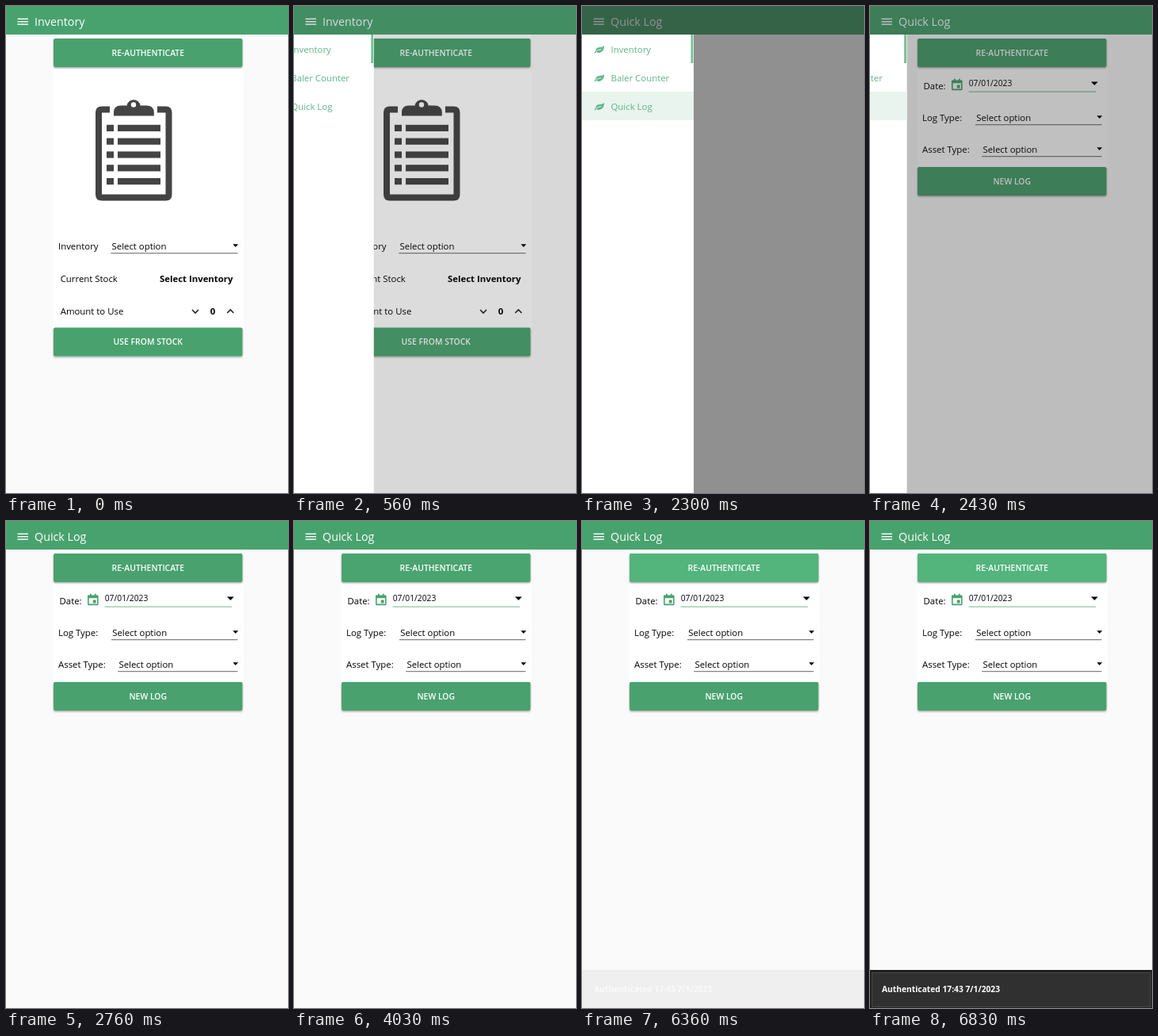
An HTML page for the animation above (8000 ms loop, 356x614 px).

```html
<!DOCTYPE html>
<html lang="en">
<head>
<meta charset="utf-8">
<title>Inventory</title>
<style>
html, body { margin: 0; width: 100%; height: 100%; overflow: hidden; background: #fafafa; }
svg { display: block; width: 100%; height: 100%; }
text { font-family: "Open Sans", "Noto Sans", sans-serif; font-size: 11.4px; white-space: pre; }
.title { font-size: 14.3px; fill: #fff; }
.btn { font-size: 10.4px; font-weight: 600; fill: #fff; text-anchor: middle; }
.bold { font-weight: 700; }
.nav { fill: #5fb588; }
</style>
</head>
<body>
<svg id="stage" viewBox="0 0 356 614" xmlns="http://www.w3.org/2000/svg"></svg>
<script>
const LOOP = 8000;
const GREEN = '#48a26e';
const DRAWER = 141;

const text = (x, y, s, cls = '', extra = '') => `<text x="${x}" y="${y}" class="${cls}" ${extra}>${s}</text>`;
const rect = (x, y, w, h, fill, extra = '') =>
  `<rect x="${x}" y="${y}" width="${w}" height="${h}" fill="${fill}" ${extra}/>`;
const path = (d, extra = '') => `<path d="${d}" ${extra}/>`;
const caret = (x, y, w, h) => path(`M${x} ${y}h${w}l${-w / 2} ${h}z`);

const button = (y, label, cx) =>
  rect(60, y, 238.5, 36, GREEN, 'rx="2" filter="url(#lift)"') + text(cx, y + 21.8, label, 'btn');

const select = (x, y) =>
  text(x + 1.2, y, 'Select option') +
  rect(x, y + 4.2, 292.5 - x, 1, '#666') +
  caret(286.4, y - 6.8, 6.8, 3.8);

function clipboard() {
  let rows = '';
  for (let i = 0; i < 5; i++) {
    const y = 149.8 + i * 16.8;
    rows += rect(127, y, 9, 8.2, '#444') + rect(141, y, 54, 8.2, '#444');
  }
  return path('M131 130.6H121q-4 0-4 4V237.5q0 4 4 4H201.5q4 0 4-4V134.6q0-4-4-4H191',
      'fill="none" stroke="#444" stroke-width="8"') +
    path('M136 138.5v-4q0-9 9-9h7.6a8.6 8.6 0 0 1 17 0h7.6q9.6 0 9.6 9v4z', 'fill="#444"') +
    '<circle cx="161" cy="124.5" r="3.2" fill="#fff"/>' + rows;
}

const calendar = () =>
  path('M104 93.5h2v-1.8h1.8v1.8h4v-1.8h1.8v1.8h2q1 0 1 1v10.6q0 1.2-1.2 1.2h-10.8q-1.6 0-1.6-1.2v-10.6q0-1 1-1z' +
    'M104.6 97.2v7.4h10.4v-7.4zM109.8 99.6h3.8v3.8h-3.8z', `fill="${GREEN}" fill-rule="evenodd"`);

const chevron = (x, y, h) =>
  path(`M${x} ${y}l4 ${h}l4 ${-h}`, 'fill="none" stroke="#222" stroke-width="1.6"');

const leaf = y =>
  `<g transform="translate(15.5 ${y})">` +
  path('M12.4 0Q11 2 7.6 2Q2 2 1.6 6.8Q.2 8 .2 9.2Q1 10 1.7 8.6L2.6 7.9Q6.2 10 9.4 7.6Q13 4.8 12.4 0z', 'class="nav"') +
  path('M2.2 7.2Q4.6 4.9 8.8 4.7', 'fill="none" stroke="#fff" stroke-width=".9"') + '</g>';

const navItem = (i, label) => leaf(50 + i * 36) + text(36.5, 59 + i * 36, label, 'nav');

const stage = document.getElementById('stage');
stage.innerHTML = `
<defs>
  <filter id="lift" x="-5%" y="-20%" width="110%" height="150%">
    <feDropShadow dx="0" dy="1.2" stdDeviation="1.2" flood-color="#000" flood-opacity=".38"/>
  </filter>
  <clipPath id="btnClip"><rect x="60" y="41" width="238.5" height="36" rx="2"/></clipPath>
</defs>
${rect(0, 0, 356, 614, '#fafafa')}
<g id="inventory">
  ${rect(59, 36, 241, 370, '#fff')}
  ${button(41, 'RE-AUTHENTICATE', 179.3)}
  ${clipboard()}
  ${text(66, 307, 'Inventory')}${select(132.3, 307)}
  ${text(68.7, 348, 'Current Stock')}
  ${text(286.5, 348, 'Select Inventory', 'bold', 'text-anchor="end"')}
  ${text(68.7, 389, 'Amount to Use')}
  ${chevron(235, 383, 4)}${text(261, 389, '0', 'bold', 'text-anchor="middle"')}${chevron(279.3, 387, -4)}
  ${button(405.5, 'USE FROM STOCK', 179.3)}
</g>
<g id="log">
  ${rect(59, 36, 241, 168, '#fff')}
  ${button(41, '', 179.3)}
  <g clip-path="url(#btnClip)">
    ${rect(60, 41, 238.5, 36, '#53b47c', 'id="hover"')}
    <circle id="ripple" cx="180" cy="59" fill="#fff"/>
  </g>
  ${text(179.3, 62.8, 'RE-AUTHENTICATE', 'btn')}
  ${text(67.5, 105, 'Date:')}${calendar()}
  ${text(124.7, 101, '07/01/2023', '', 'style="font-size:10.3px"')}
  ${rect(124.5, 107.6, 160.5, 1, '#6fb890')}${caret(279, 95.5, 8.8, 4.6)}
  ${text(66, 145, 'Log Type:')}${select(133, 145)}
  ${text(66, 185, 'Asset Type:')}${select(141.2, 185)}
  ${button(203, 'NEW LOG', 179.3)}
</g>
${rect(0, 0, 356, 36, GREEN)}
${[15.6, 19, 22.4].map(y => rect(14.5, y, 13.5, 1.4, '#fff')).join('')}
${text(36, 25, '', 'title', 'id="title"')}
${rect(0, 0, 356, 614, '#212121', 'id="scrim"')}
<g id="drawer">
  ${rect(0, 36, DRAWER, 578, '#fff')}
  ${rect(0, 108, DRAWER, 36, '#e8f4ed', 'id="navHover"')}
  ${rect(137.5, 36, 2.8, 36, '#74c096')}
  ${['Inventory', 'Baler Counter', 'Quick Log'].map((s, i) => navItem(i, s)).join('')}
</g>
<g id="toast">
  ${rect(0, 566, 356, 48, '#1f1f1f')}
  ${rect(2.5, 569.5, 351.5, 43, '#303030', 'stroke="#484848"')}
  ${text(15, 594, 'Authenticated 17:43 7/1/2023', 'bold', 'fill="#fff" style="font-size:10.25px"')}
</g>`;

const el = {};
stage.querySelectorAll('g[id], rect[id], circle[id], text[id]').forEach(n => el[n.id] = n);

const set = (node, name, value) => node.setAttribute(name, value);
const show = (node, on) => set(node, 'display', on ? 'inline' : 'none');
const ramp = (t, start, length) => Math.min(1, Math.max(0, (t - start) / length));

// CSS-style cubic-bezier timing, solved by bisection
function bezier(x1, y1, x2, y2) {
  const at = (s, a, b) => 3 * (1 - s) * (1 - s) * s * a + 3 * (1 - s) * s * s * b + s * s * s;
  return x => {
    if (x <= 0 || x >= 1) return x;
    let lo = 0, hi = 1;
    for (let i = 0; i < 24; i++) {
      const mid = (lo + hi) / 2;
      if (at(mid, x1, x2) < x) lo = mid; else hi = mid;
    }
    return at(lo, y1, y2);
  };
}
const ease = bezier(0.25, 0.1, 0.25, 1);
const decel = bezier(0, 0, 0.2, 1);

function draw(t) {
  const opening = t < 2300;
  show(el.inventory, opening);
  show(el.log, t >= 2350);
  el.title.textContent = opening ? 'Inventory' : 'Quick Log';

  const slide = opening ? decel(ramp(t, 480, 225)) : 1 - decel(ramp(t, 2335, 300));
  set(el.drawer, 'transform', `translate(${(slide - 1) * DRAWER} 0)`);
  show(el.drawer, slide > 0);
  show(el.navHover, !opening);
  // the very first change of the picture is at 500 ms
  const dim = t < 490 ? 0 : opening ? ease(ramp(t, 455, 500)) : 1 - ease(ramp(t, 2320, 430));
  set(el.scrim, 'opacity', 0.49 * dim);

  set(el.hover, 'opacity', ease(ramp(t, 4000, 250)));
  const wave = ramp(t, 4200, 500);
  set(el.ripple, 'r', 130 * ease(wave));
  set(el.ripple, 'opacity', wave > 0 ? 0.12 * (1 - wave) : 0);

  const rise = ramp(t, 6330, 490);
  set(el.toast, 'opacity', ease(rise));
  show(el.toast, rise > 0);
}

const begin = performance.now();
function frame() {
  draw((performance.now() - begin) % LOOP);
  requestAnimationFrame(frame);
}
draw(0);
requestAnimationFrame(frame);
</script>
</body>
</html>
```
